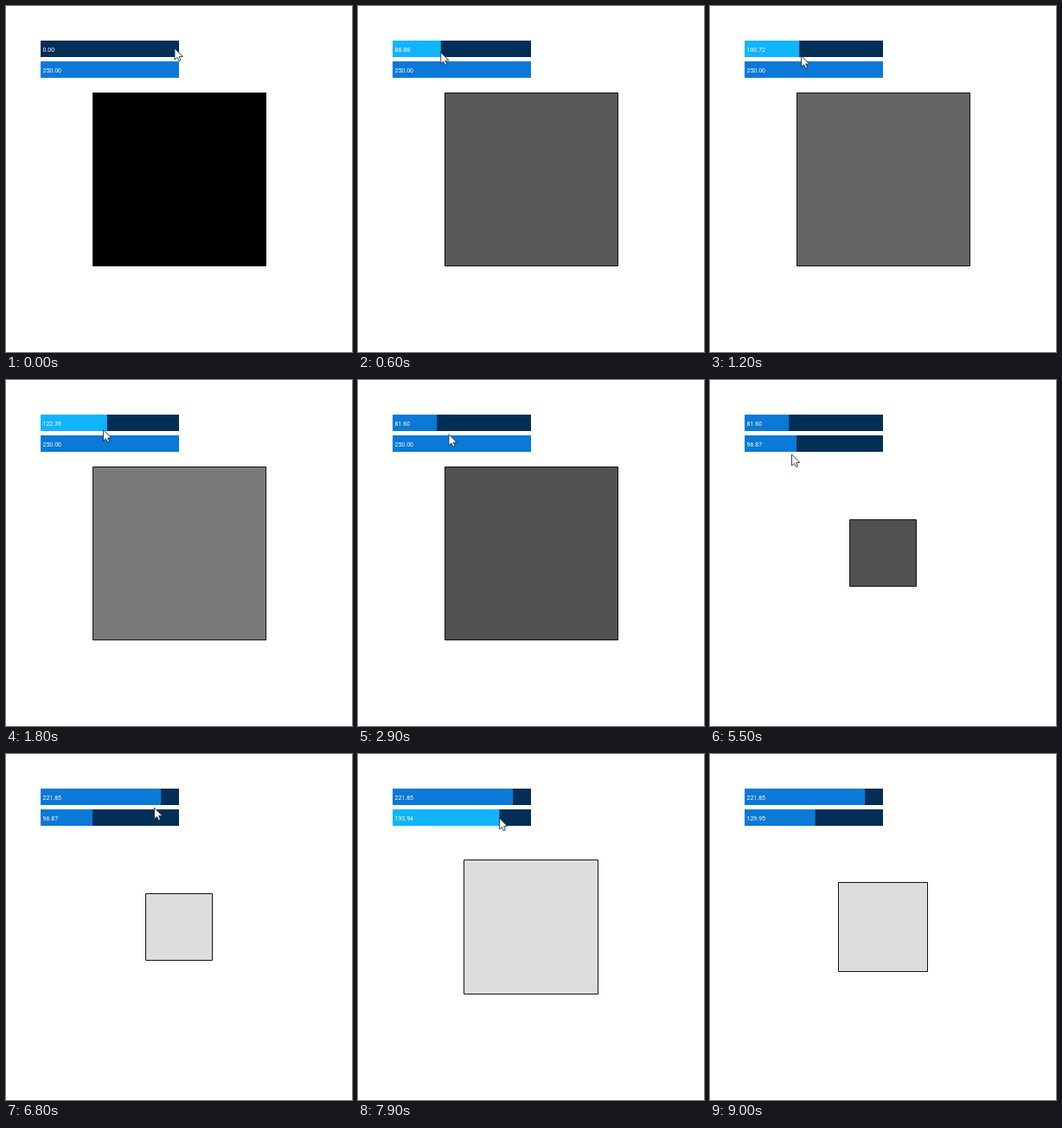
An HTML page with a canvas that plays this animation: 400x400 px, repeating every 9600 ms.

```html
<!DOCTYPE html>
<html lang="en">
<head>
<meta charset="utf-8">
<title>Slider square</title>
<style>
  html, body { margin: 0; width: 100%; height: 100%; overflow: hidden; background: #fff; }
  canvas { display: block; }
</style>
</head>
<body>
<canvas id="stage" width="400" height="400"></canvas>
<script>
const ctx = document.getElementById('stage').getContext('2d');
const LOOP = 9600, STEP = 100;
const BAR = { x: 40, w: 160, h: 19 };
const COLORS = { back: '#032e56', front: '#0a79d7', active: '#10b4ff' };

// Slider positions run from 0 to 200; keys are [time, position].
const sliders = [
  {
    y: 40, min: 0, max: 255, drags: [[100, 2800], [5900, 6800]],
    keys: [[0, 0], [99, 0], [100, 194], [800, 20], [1200, 79], [1500, 150],
           [1800, 95.996], [2200, 30], [2700, 64], [5900, 64], [6700, 174]]
  },
  {
    y: 64, min: 5, max: 250, drags: [[3300, 5400], [7100, 8400]],
    keys: [[0, 200], [3300, 200], [4100, 21], [4700, 183.7], [5000, 163.3],
           [5300, 75], [7000, 75], [7700, 167.3], [7800, 167.3], [8300, 102]]
  }
];

// Pointer keys are [time, x, y].
const pointerKeys = [
  [0, 195, 49], [100, 195, 50], [800, 56, 55], [1200, 105.5, 57.5],
  [1500, 158, 59], [1800, 112.5, 57.5], [2200, 64, 58], [2700, 91, 56],
  [3000, 112, 66], [3300, 197, 74], [4100, 57, 87], [4700, 187, 86],
  [5000, 170, 86], [5300, 100, 86], [5500, 94.5, 86], [5900, 91, 52],
  [6700, 179, 60], [6800, 171.5, 62], [7000, 100, 74], [7700, 174, 74],
  [7800, 174, 74], [8300, 121, 74], [8500, 121, 74], [8600, 125, 69],
  [8700, 125, 69], [8800, 135, 45], [8900, 145, 4]
];
const POINTER_END = 9000;
const arrow = new Path2D('M0 0V13L3 10.4L5 14.6L7 13.7L5.2 9.6L9.2 9.4Z');

function sample(keys, t, column = 1) {
  const next = keys.findIndex(key => key[0] > t);
  if (next < 0) return keys[keys.length - 1][column];
  const a = keys[next - 1], b = keys[next];
  return a[column] + (b[column] - a[column]) * (t - a[0]) / (b[0] - a[0]);
}

function drawSlider(slider, t, pointer) {
  const position = sample(slider.keys, t) / 200;
  const value = slider.min + (slider.max - slider.min) * position;
  const dragging = slider.drags.some(([from, to]) => t >= from && t < to);
  const hovered = pointer && pointer.y >= slider.y && pointer.y < slider.y + BAR.h;

  ctx.fillStyle = COLORS.back;
  ctx.fillRect(BAR.x, slider.y, BAR.w, BAR.h);
  ctx.fillStyle = dragging || hovered ? COLORS.active : COLORS.front;
  ctx.fillRect(BAR.x, slider.y, BAR.w * position, BAR.h);

  const shown = Math.floor(value * 100 + 1e-6) / 100;
  ctx.fillStyle = '#fff';
  ctx.font = '7px Roboto, sans-serif';
  ctx.fillText(shown.toFixed(2), 42.5, slider.y + 12.5);
  return value;
}

function drawSquare(gray, size) {
  const low = Math.floor(200 - size * 0.4);
  const high = Math.floor(200 + size * 0.4);
  const level = Math.floor(gray);
  ctx.fillStyle = `rgb(${level}, ${level}, ${level})`;
  ctx.strokeStyle = '#101414';
  ctx.lineWidth = 1;
  ctx.beginPath();
  ctx.rect(low + 0.5, low + 0.5, high - low, high - low);
  ctx.fill();
  ctx.stroke();
}

function drawPointer({ x, y }) {
  ctx.save();
  ctx.translate(x, y);
  ctx.fillStyle = '#fff';
  ctx.strokeStyle = '#1a3050';
  ctx.lineWidth = 0.9;
  ctx.fill(arrow);
  ctx.stroke(arrow);
  ctx.restore();
}

function draw() {
  const t = Math.floor(performance.now() % LOOP / STEP) * STEP;
  const pointer = t < POINTER_END &&
    { x: sample(pointerKeys, t, 1), y: sample(pointerKeys, t, 2) };

  ctx.fillStyle = '#fff';
  ctx.fillRect(0, 0, 400, 400);
  const [gray, size] = sliders.map(slider => drawSlider(slider, t, pointer));
  drawSquare(gray, size);
  if (pointer) drawPointer(pointer);
  requestAnimationFrame(draw);
}
draw();
</script>
</body>
</html>
```
